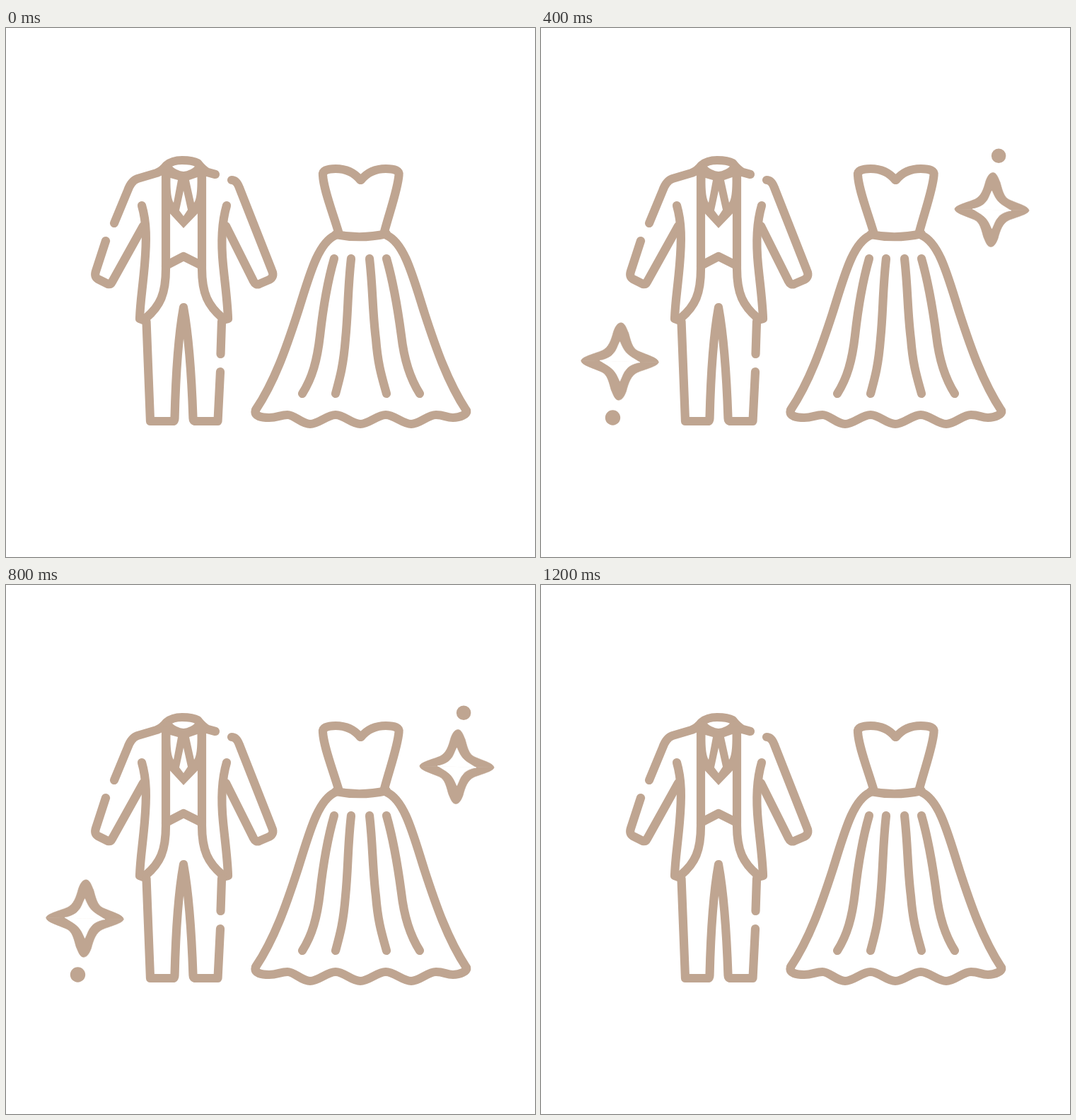
An HTML page with a canvas for the animation above (1.4 s loop, 748 by 748 pixels).

```html
<!DOCTYPE html>
<html lang="en">
<head>
<meta charset="utf-8">
<title>Wedding outfits</title>
<style>
  html, body { margin: 0; width: 100%; height: 100%; overflow: hidden; background: #fff; }
  canvas { display: block; width: 100vw; height: 100vh; }
</style>
</head>
<body>
<canvas id="stage" width="748" height="748"></canvas>
<script>
const ctx = document.getElementById('stage').getContext('2d');
const TAN = '#bfa591';
const STEP = 200;
const STEPS = 7;

const suit = [
  // left shoulder, collar, right shoulder
  'M153 276L172 230Q177 216 186 213L213 205Q221 202 227 194Q235 187 249 187Q264 187 271 191Q278 200 285 204L296 207',
  'M228 198Q251 220 274 198',
  // sleeves
  'M141 301L127 344Q124 353 132 356L144 362Q148 363 150 359L194 280',
  'M319 215Q326 215 330 226L376 343Q380 352 372 356L358 362Q353 364 350 358L311 280',
  // jacket sides
  'M192 251C199 275 199 300 196 335S190 385 189 411L197 414',
  'M312 251C305 275 304 305 307 335S313 385 314 411L306 413',
  // lapels and vest hem
  'M226 205V340C226 376 218 393 198 410',
  'M277 205V340C277 376 286 393 306 410',
  'M226 336L251 323L277 336',
  // trousers
  'M198.500 415L204 556L236 556Q238.500 556 238.500 552Q241 450 251 395Q261 450 264.500 552Q264.500 556 268 556L299.500 556L303 486',
  'M305 415L303.500 461'
];

const dress = [
  // bodice
  'M501 215Q488 199 466 199Q447 199 448 208C449 228 461 258 470 288',
  'M502 215Q515 199 537 199Q557 199 555.500 208C554 228 543 258 535 288',
  'M466 292Q502 299 538 291',
  // skirt
  'M466 293C440 304 428 354 412 404C397 450 380 500 353 540',
  'M538 293C564 304 576 354 592 404C607 450 624 500 651 541',
  'M353 541C350 549 362 551 372 551C384 551 388 547 398 547S418 560 430 560S454 547 466 547S489 560 501 560S525 547 537 547S561 560 573 560S596 547 608 547S622 551 632 551C642 551 653 546 651 541',
  // pleats
  'M464 326C455 357 449 390 444 435C440 470 433 495 419 517',
  'M488 326C483 370 484 400 480 440C477 478 472 495 466 517',
  'M514 326C519 370 518 400 523 440C526 478 532 495 538 517',
  'M538 326C547 357 553 390 559 435C563 470 571 495 585 517'
];

const lines = [...suit, ...dress].map(d => new Path2D(d));
const tie = new Path2D('M226 205H277V256L251 283L226 256Z');
const tieGaps = new Path2D(
  'M232.500 212L243 215L237 247Q232 240 232.500 212Z' +
  'M270.500 211L259 215L266 247Q271 240 270.500 211Z' +
  'M251 230L257 257L251 266L245 258Z');

// each half is completed by a half turn
const outer = new Path2D('M-49 -1C-49 -6 -31 -10 -22 -14C-14 -18 -11 -27 -8 -38C-5 -46 -2 -49 1.500 -49C6 -49 8 -43 11 -36C15 -21 17 -15 26 -12C38 -7 49 -4 49 1Z');
const inner = new Path2D('M-25 -1C-16 -3 -11 -6 -8 -10C-4 -14 -3 -19 0 -25C3 -18 5 -14 9 -10C13 -6 17 -4 25 1Z');

// [x, y, scale] for each spread of the sparkles
const leftPose = [[138, 441.5, 1], [111.5, 471.5, 1.115], [83, 505, 1.245]];
const rightPose = [[611.5, 248, 0.953], [637.5, 257, 1.07], [668.5, 266.5, 1.195]];

function fillTurned(path, color) {
  ctx.fillStyle = ctx.strokeStyle = color;
  ctx.lineWidth = 0.6;
  for (let i = 0; i < 2; i++) {
    ctx.fill(path);
    ctx.stroke(path);
    ctx.rotate(Math.PI);
  }
}

function sparkle([x, y, scale], turn) {
  ctx.save();
  ctx.translate(x, y);
  ctx.rotate(turn);
  ctx.scale(scale, scale);
  fillTurned(outer, TAN);
  fillTurned(inner, '#fff');
  ctx.fillStyle = TAN;
  ctx.beginPath();
  ctx.arc(-9, 71.3, 9.6, 0, Math.PI * 2);
  ctx.fill();
  ctx.restore();
}

function outfits() {
  ctx.strokeStyle = ctx.fillStyle = TAN;
  ctx.lineWidth = 12.2;
  ctx.lineCap = ctx.lineJoin = 'round';
  lines.forEach(p => ctx.stroke(p));
  ctx.fill(tie);
  ctx.fillStyle = '#fff';
  ctx.fill(tieGaps);
}

function draw(now) {
  const step = Math.floor(now / STEP) % STEPS;
  const spread = Math.min(step, STEPS - 1 - step);
  ctx.fillStyle = '#fff';
  ctx.fillRect(0, 0, 748, 748);
  outfits();
  if (spread > 0) {
    sparkle(leftPose[spread - 1], 0);
    sparkle(rightPose[spread - 1], Math.PI);
  }
}

let start;
function tick(now) {
  start ??= now;
  draw(now - start);
  requestAnimationFrame(tick);
}
draw(0);
requestAnimationFrame(tick);
</script>
</body>
</html>
```
